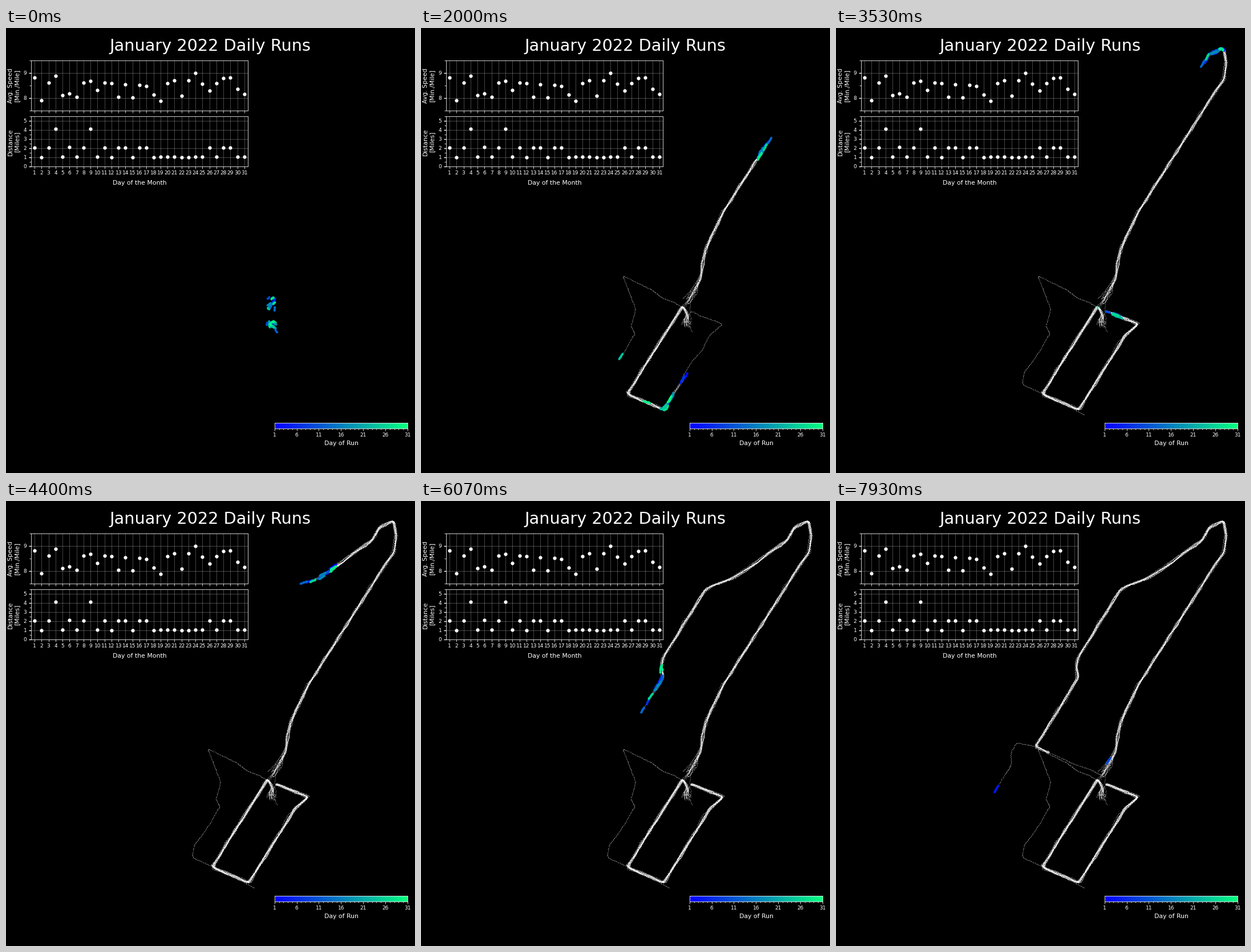
Write a matplotlib script that moves like this. It is 717 px wide and 781 px high and loops after 8000 ms.

```python
import numpy as np
import matplotlib.pyplot as plt
from matplotlib.animation import FuncAnimation

W, H, DPI = 717, 781, 64
FRAMES, LOOP_MS = 120, 8000
TITLE, LABEL, TICK = 32.4, 12.2, 10.1
HALF_STREAK = 6  # pixels of road lit before and after each runner

rng = np.random.default_rng(22)
days = np.arange(1, 32)
pace = [8.82, 7.91, 8.60, 8.89, 8.11, 8.18, 8.04, 8.60, 8.67, 8.32, 8.61,
        8.59, 8.05, 8.53, 8.02, 8.52, 8.46, 8.13, 7.89, 8.59, 8.69, 8.09,
        8.69, 8.99, 8.56, 8.28, 8.58, 8.78, 8.81, 8.36, 8.16]
two_mile_days = [1, 3, 6, 8, 11, 13, 14, 16, 17, 26, 28, 29]
four_mile_days = [4, 9]
laps = np.select([np.isin(days, two_mile_days), np.isin(days, four_mile_days)],
                 [2, 4], 1)
miles = 1.035 * laps + rng.uniform(-0.02, 0.03, 31)

# Roads as a few corners in pixels
north = [(466, 484), (490, 437), (497, 392), (530, 323), (662, 115),
         (679, 90), (683, 62), (679, 35), (655, 46), (641, 70), (575, 117),
         (545, 137), (510, 149), (498, 156), (425, 274), (421, 292),
         (424, 311), (349, 432), (374, 443)]
south = [(468, 522), (463, 516), (469, 506), (459, 488), (361, 643),
         (425, 671), (505, 541), (529, 520), (472, 497)]
west = [(469, 497), (405, 462), (353, 436), (376, 492), (368, 522),
        (375, 538), (328, 606), (326, 625), (362, 641), (438, 680)]
far_west = [(316, 422), (308, 440), (309, 462), (268, 533)]

special = {
    4: north[:-1] + far_west,
    9: north + north[:2],
    24: west,
    26: north[:-2] + [(366, 406)],
    30: south[:3] + south[:2:-1],
}


def trace(corners):
    """Walk the road one pixel at a time with a drifting position error."""
    p = np.array(corners, float)
    s = np.r_[0, np.cumsum(np.hypot(*np.diff(p, axis=0).T))]
    u = np.arange(0, s[-1])
    knots = np.arange(0, s[-1] + 25, 25)
    spread = 1.5 + 3.5 * np.exp(-u / 18)
    cols = []
    for c in p.T:
        line = np.pad(np.interp(u, s, c), 5, mode="edge")
        line = np.convolve(line, np.ones(11) / 11, "valid")
        drift = np.interp(u, knots, rng.normal(size=len(knots)))
        cols.append(line + spread * drift + rng.normal(0, 0.3, len(u)))
    return np.column_stack(cols)


runs = []
for day, p, n in zip(days, pace, laps):
    speed = 86 / p
    if n == 1 and day < 8:
        speed *= 1.12
    elif n == 4:
        speed *= 1.03
    road = special.get(day, north if n > 1 else south)
    runs.append((trace(road), speed, plt.cm.winter((day - 1) / 30)))

plt.style.use("dark_background")
plt.rcParams.update({"font.family": "DejaVu Sans", "axes.linewidth": 0.9})
fig = plt.figure(figsize=(W / DPI, H / DPI), dpi=DPI, facecolor="black")


def box(left, top, right, bottom):
    return fig.add_axes([left / W, 1 - bottom / H,
                         (right - left) / W, (bottom - top) / H])


def label(x, y, text, size=LABEL, va="center", **kw):
    fig.text(x / W, 1 - y / H, text, size=size, ha="center", va=va, **kw)


def chart(top, values, ylim, yticks):
    ax = box(44, top, 424, top + 88)
    ax.set(xlim=(0.5, 31.5), ylim=ylim, xticks=days, yticks=yticks)
    ax.set_yticks(np.arange(ylim[0], ylim[1] + 0.1, 0.5), minor=True)
    ax.grid(color="white", alpha=0.38, lw=0.8)
    ax.set_axisbelow(True)
    ax.tick_params(labelsize=TICK, length=4.5, width=0.9, pad=3.5)
    ax.tick_params(axis="y", width=1.6, length=5)
    ax.tick_params(axis="y", which="minor", length=3, width=0.9)
    ax.plot(days, values, "o", color="white", ms=6)
    return ax


label(358, 40, "January 2022 Daily Runs", TITLE, va="baseline")
speed_ax = chart(56.7, pace, (7.5, 9.5), [8, 9])
speed_ax.tick_params(axis="x", labelbottom=False)
chart(155, miles, (0, 5.5), range(6))
label(13.5, 101, "Avg. Speed\n[Min./Mile]", rotation=90)
label(13.5, 200, "Distance\n[Miles]", rotation=90)
label(234.5, 272, "Day of the Month")

bar = box(470.8, 692.8, 703.8, 703)
bar.imshow(np.linspace(0, 1, 256)[None], cmap="winter", aspect="auto",
           extent=(1, 31, 0, 1))
bar.set(xticks=range(1, 32, 5), yticks=[])
bar.set_xticks(days, minor=True)
bar.tick_params(labelsize=TICK, length=4.5, width=0.9, pad=3.5)
bar.tick_params(which="minor", length=2.8, width=0.9)
label(587.5, 729, "Day of Run")

field = box(0, 0, W, H)
field.set(xlim=(0, W), ylim=(H, 0))
field.axis("off")
trail, = field.plot([], [], ",", color="white", alpha=0.4)
heads = field.scatter([], [], s=17, linewidths=0, zorder=3)


def update(k):
    past, lit, colors = [], [], []
    for pts, speed, color in runs:
        at = int(speed * k)
        tail = max(at - HALF_STREAK, 0)
        streak = pts[tail:at + HALF_STREAK]
        past.append(pts[:tail])
        lit.append(streak)
        colors += [color] * len(streak)
    trail.set_data(*np.concatenate(past).T)
    heads.set_offsets(np.concatenate(lit))
    heads.set_facecolors(colors)
    return trail, heads


anim = FuncAnimation(fig, update, frames=FRAMES, interval=LOOP_MS / FRAMES,
                     repeat=True, repeat_delay=0)
plt.show()
```
